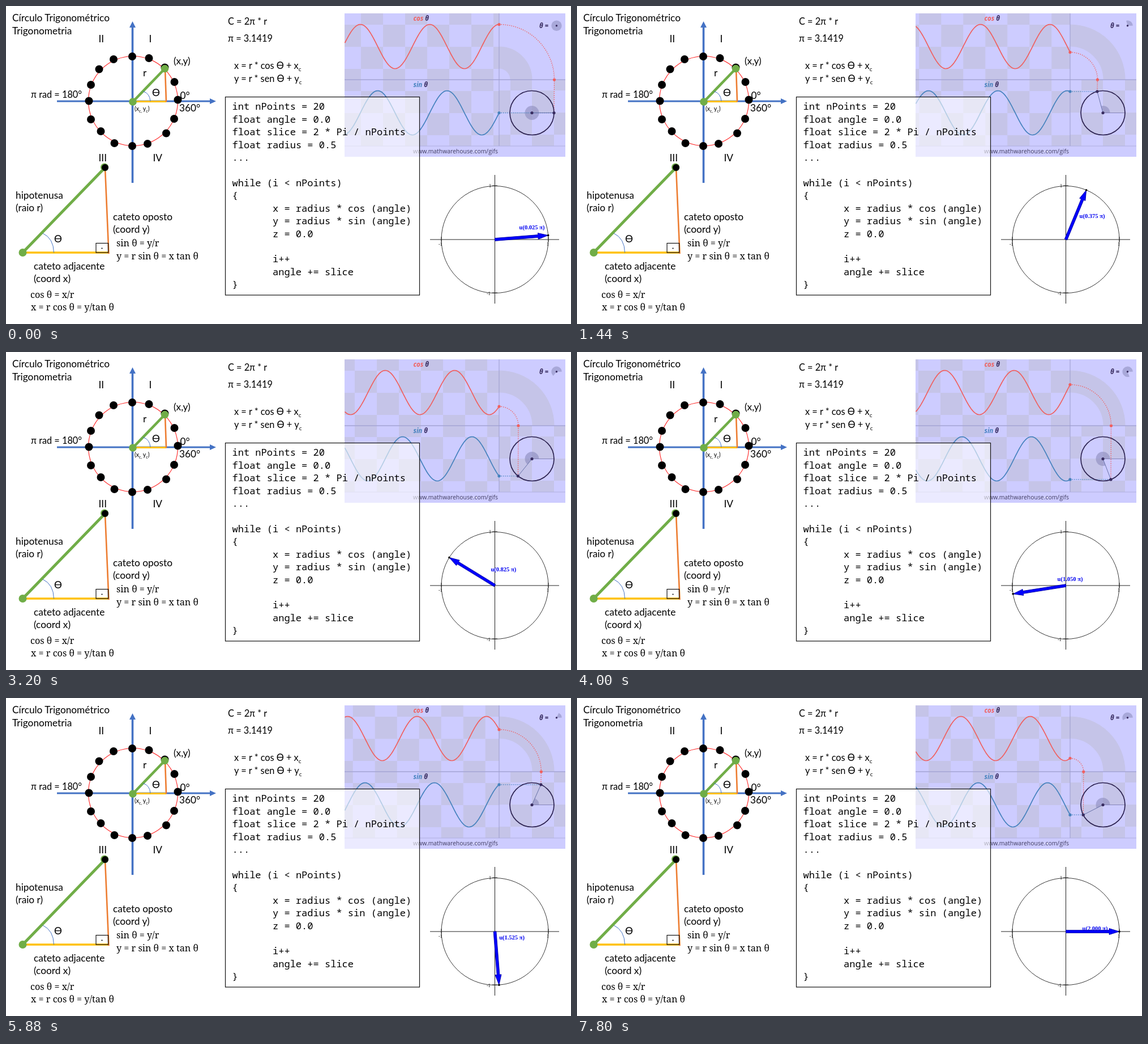
An HTML page for the animation above (7840 ms loop, 998x561 px).

```html
<!DOCTYPE html>
<html lang="pt">
<head>
<meta charset="utf-8">
<title>Círculo Trigonométrico</title>
<style>
html, body { margin: 0; width: 100%; height: 100%; overflow: hidden; background: #fff; }
svg { display: block; width: 998px; height: 561px; }
text { white-space: pre; }
.t { font: 17.3px Lato, sans-serif; }
.f { font: 16.3px Lato, sans-serif; }
.m { font: 16.2px "Noto Serif", serif; }
.c { font: 17.05px "Noto Sans Mono", monospace; }
.w { font: italic 700 11.5px "Open Sans", sans-serif; }
.u { font: 700 10.5px "Liberation Serif", serif; fill: #0000f0; }
.k { font: 8px "Liberation Serif", serif; }
</style>
</head>
<body>
<svg id="stage" viewBox="0 0 998 561"></svg>
<script>
const NS = "http://www.w3.org/2000/svg";
const stage = document.getElementById("stage");
const LOOP = 7840, TAU = Math.PI * 2;

function el(tag, attrs, parent = stage) {
  const e = document.createElementNS(NS, tag);
  for (const k in attrs) e.setAttribute(k, attrs[k]);
  parent.appendChild(e);
  return e;
}
const set = (e, attrs) => { for (const k in attrs) e.setAttribute(k, attrs[k]); };
const line = (x1, y1, x2, y2, stroke, w = 1) =>
  el("line", { x1, y1, x2, y2, stroke, "stroke-width": w });
const dot = (cx, cy, r, fill) => el("circle", { cx, cy, r, fill });
const ring = (cx, cy, r, stroke, w) =>
  el("circle", { cx, cy, r, fill: "none", stroke, "stroke-width": w });
const rect = (x, y, width, height, fill, more = {}) => el("rect", { x, y, width, height, fill, ...more });
const path = (d, stroke, w, more = {}) => el("path", { d, fill: "none", stroke, "stroke-width": w, ...more });
function text(str, x, y, cls = "t", more = {}) {
  const e = el("text", { x, y, class: cls, ...more });
  e.textContent = str;
  return e;
}
function sub(e, parts) {
  parts.forEach(([s, a]) => { el("tspan", a || {}, e).textContent = s; });
}

// Wave panel
const AX = 871, MID = 130, AMP = 39, COS_Y = 71.5, SIN_Y = 188.5, WAVE = AMP * Math.PI;
const LIGHT = "#cdccff", DARK = "#c5c4e8", RED = "#f06060", BLUE = "#4682be", INK = "#382c60";
const wheel = { x: 929, y: SIN_Y };

const defs = el("defs", {});
const tiles = el("pattern", { id: "tiles", width: 78, height: 78, patternUnits: "userSpaceOnUse" }, defs);
el("rect", { width: 78, height: 78, fill: LIGHT }, tiles);
el("rect", { width: 39, height: 39, fill: DARK }, tiles);
el("rect", { x: 39, y: 39, width: 39, height: 39, fill: DARK }, tiles);

rect(598, 13, 390, 253, LIGHT);
rect(598, 13, 273, 234, "url(#tiles)");
const bend = path("", DARK, 39);
[[891, 130, 38, 19], [968, 130, 20, 19], [871, 149, 20, 39], [929, 149, 39, 39],
 [891, 188, 38, 39], [968, 188, 20, 39], [871, 227, 20, 20], [929, 227, 39, 20]]
  .forEach(b => rect(...b, DARK));
line(598, MID, 988, MID, "#a4a4d4", 1.3);
line(598, 247, 988, 247, "#b0b0de");
line(AX, 13, AX, 247, "#9c9ccc");
[["cos ", RED, 26], ["sin ", BLUE, 143]].forEach(([s, fill, y]) =>
  sub(text("", 719.5, y, "w"), [[s, { fill }], ["θ", { fill: INK }]]));
text("θ =", 942, 38.5, "w", { fill: INK });
text("www.mathwarehouse.com/gifs", 794, 260, "", {
  "text-anchor": "middle", fill: "#403c60", style: "font:10.4px 'Open Sans',sans-serif" });

const sector = (op) => el("path", { fill: "#9090c0", "fill-opacity": op });
const bigPie = sector(.65), smallPie = sector(.6);
const cosWave = path("", RED, 1.7), sinWave = path("", BLUE, 1.7);
const dash = { "stroke-dasharray": "1.6 2" };
const cosLink = path("", RED, 1.3, dash), sinLink = path("", BLUE, 1.3, dash);
line(wheel.x, wheel.y, wheel.x + AMP, wheel.y, "#7474a8", .8);
const spoke = path("", "#6872a8", 1);
ring(wheel.x, wheel.y, AMP, "#2c2250", 1.7);
dot(wheel.x, wheel.y, 2.6, INK);
dot(972.5, 34.8, 1.7, INK);
const cosDot = dot(AX, 0, 2.6, RED), turnDot = dot(0, MID, 2.6, RED);
const sinDot = dot(AX, 0, 2.6, BLUE), rimDot = dot(0, 0, 2.6, INK);

function wave(fn, cy, a) {
  let d = "";
  for (let x = 598.5; x <= AX; x += 1.5)
    d += `${d ? "L" : "M"}${x} ${(cy - AMP * fn(a - (AX - x) * TAU / WAVE)).toFixed(2)}`;
  return d + `L${AX} ${cy - AMP * fn(a)}`;
}
function pie(x, y, r, a) {
  if (a === 0) return `M${x - r} ${y}a${r} ${r} 0 1 0 ${2 * r} 0a${r} ${r} 0 1 0 ${-2 * r} 0`;
  return `M${x} ${y}h${r}A${r} ${r} 0 ${+(a > Math.PI)} 0 ${x + r * Math.cos(a)} ${y - r * Math.sin(a)}Z`;
}
function drawWaves(step) {
  const a = step % 120 * TAU / 120, c = AMP * Math.cos(a), s = AMP * Math.sin(a);
  const y = COS_Y - c, x = wheel.x + c, r = MID - y, sy = wheel.y - s;
  // the checkerboard slides by one full repeat per turn
  set(tiles, { patternTransform: `translate(${822 - a / TAU * 78} 33)` });
  const R = a < .8 ? 39 : 78;
  set(bend, { d: `M${AX} ${MID - R}A${R} ${R} 0 0 1 ${AX + R} ${MID}` });
  set(cosWave, { d: wave(Math.cos, COS_Y, a) });
  set(sinWave, { d: wave(Math.sin, SIN_Y, a) });
  set(cosLink, { d: `M${AX} ${y}A${r} ${r} 0 0 1 ${AX + r} ${MID}L${x} ${sy}` });
  set(sinLink, { d: `M${AX} ${sy}H${x}` });
  set(spoke, { d: `M${wheel.x} ${wheel.y}L${x} ${sy}` });
  set(bigPie, { d: pie(wheel.x, wheel.y, 12.5, a) });
  set(smallPie, { d: pie(972.5, 34.8, 9.2, a) });
  set(cosDot, { cy: y });
  set(turnDot, { cx: AX + r });
  set(sinDot, { cy: sy });
  set(rimDot, { cx: x, cy: sy });
}

// Code box
rect(387.5, 160.5, 343, 349.5, "#fff", { "fill-opacity": .6, stroke: "#111", "stroke-width": 1.2 });
`int nPoints = 20
float angle = 0.0
float slice = 2 * Pi / nPoints
float radius = 0.5
...

while (i < nPoints)
{
       x = radius * cos (angle)
       y = radius * sin (angle)
       z = 0.0

       i++
       angle += slice
}`.split("\n").forEach((s, i) => {
  const code = s.trimStart();
  text(code, code === s ? 399.5 : 471, 183.3 + i * 22.42, "c");
});

// Unit circle on the left
const AXIS = "#4472c4", GREEN = "#70ad47", ORANGE = "#ed7d31", GOLD = "#ffc000";
line(223.5, 312, 223.5, 38, AXIS, 3.6);
line(90, 168, 362, 168, AXIS, 3);
path("M223.5 27l5.5 11h-11zM371 168l-11 -5v10z", "none", 0, { fill: AXIS });
ring(224.5, 167.5, 79, "#ff2020", 1.1);
line(224, 168.5, 283, 168.5, GOLD, 3);
line(281, 110, 283, 169, ORANGE, 2.6);
[[223, 89], [252.5, 92], [280.5, 108.5], [297.5, 134], [303.5, 165.5], [297, 199], [283, 224.5], [250, 243],
 [223, 247], [191.5, 242], [167.5, 221], [150, 200], [146.5, 167.5], [150, 139], [164.5, 111.5], [190, 94]]
  .forEach(([x, y]) => dot(x, y, 7, "#000"));
line(224, 169, 281, 110, GREEN, 4.6);
dot(224, 169, 6.8, GREEN);
dot(280.5, 110.5, 6.8, GREEN);
path("M242 150.5Q254 154 255 168", AXIS, 1);

// Right triangle
line(29.5, 435, 181, 435, GOLD, 3.6);
line(175, 285, 181.5, 437, ORANGE, 2.6);
line(29.5, 435, 175, 285, GREEN, 4.8);
dot(29.5, 435, 7, GREEN);
dot(174, 284.5, 7, GREEN);
dot(175, 285, 6, "#000");
rect(159, 418.5, 21.5, 16.5, "none", { stroke: "#000", "stroke-width": 1.1 });
dot(169.5, 427.5, 1.1, "#000");
path("M65 401Q84 410 84.5 435", AXIS, 1);

[["Círculo Trigonométrico", 11, 27], ["Trigonometria", 11, 49.5], ["II", 163.5, 63.5], ["I", 252.5, 63.5],
 ["III", 163.5, 273.5], ["IV", 259.5, 273.5], ["r", 242, 124], ["(x,y)", 296, 103], ["ϴ", 258, 159],
 ["0°", 307.5, 164], ["360°", 306, 186], ["hipotenusa", 17, 340], ["(raio r)", 17, 362],
 ["ϴ", 85, 417], ["cateto oposto", 189, 378], ["(coord y)", 189, 400], ["cateto adjacente", 49, 465],
 ["(coord x)", 49, 487]].forEach(a => text(...a));
[["π rad = 180°", 44, 161.5], ["C = 2π * r", 392, 33], ["π = 3.1419", 392, 63]].forEach(a => text(...a, "f"));
[["sin θ = y/r", 195, 424], ["y = r sin θ = x tan θ", 195, 447],
 ["cos θ = x/r", 43, 515], ["x = r cos θ = y/tan θ", 44, 537]].forEach(a => text(...a, "m"));
const small = { "font-size": 10, dy: 4 };
sub(text("", 403, 111, "f"), [["x = r * cos ϴ + x"], ["c", small]]);
sub(text("", 403, 134, "f"), [["y = r * sen ϴ + y"], ["c", small]]);
const tiny = { "font-size": 7, dy: 2.5 }, back = { dy: -2.5 };
sub(text("", 227, 185, "t", { style: "font-size:10.6px" }), [["(x"], ["c, ", tiny], ["y", back], ["c", tiny], [")", back]]);

// Rotating vector
const O = { x: 863.5, y: 412, r: 94.5 };
line(749, O.y, 977, O.y, "#222", 1);
line(O.x, 298, O.x, 525, "#222", 1);
ring(O.x, O.y, O.r, "#222", .9);
[["1", 853, 320], ["1", 955, 423], ["-1", 764, 423], ["-1", 849, 510]].forEach(a => text(...a, "k"));
line(859, 317, 868, 317, "#222");
line(859, 506, 868, 506, "#222");
line(769, 407, 769, 416, "#222");
line(958, 407, 958, 416, "#222");
const label = text("", 0, 0, "u", { "text-anchor": "middle" });
const arrow = el("path", { fill: "#0000ff", stroke: "#0000a0", "stroke-width": .8 });
const tip = dot(0, 0, 1.8, "#000");

// step, label centre x, y
const labelPath = [[1, 929, 390], [15, 910, 370], [25, 890, 371], [42, 871, 400],
  [53, 880, 418.5], [69, 907, 421], [80, 915, 406]];

function labelAt(n) {
  let i = 0;
  while (i < labelPath.length - 2 && n > labelPath[i + 1][0]) i++;
  const at = j => labelPath[Math.max(0, Math.min(labelPath.length - 1, j))];
  const [p, q, r, s] = [at(i - 1), at(i), at(i + 1), at(i + 2)];
  const span = r[0] - q[0], u = (n - q[0]) / span;
  return [1, 2].map(k => {
    const m0 = (r[k] - p[k]) / (r[0] - p[0]) * span, m1 = (s[k] - q[k]) / (s[0] - q[0]) * span;
    const u2 = u * u, u3 = u2 * u;
    return (2 * u3 - 3 * u2 + 1) * q[k] + (u3 - 2 * u2 + u) * m0 + (3 * u2 - 2 * u3) * r[k] + (u3 - u2) * m1;
  });
}
function drawVector(n) {
  const a = n * Math.PI / 40, r = O.r, [x, y] = labelAt(n);
  set(arrow, {
    d: `M0 -2.4H${r - 18}V-5.5L${r} 0L${r - 18} 5.5V2.4H0Z`,
    transform: `translate(${O.x} ${O.y}) rotate(${-a * 360 / TAU})`
  });
  set(tip, { cx: O.x + r * Math.cos(a), cy: O.y - r * Math.sin(a) });
  set(label, { x, y: y + 3.5 });
  label.textContent = `u(${(n / 40).toFixed(3)} π)`;
}

function frame() {
  const t = performance.now() % LOOP;
  drawWaves(Math.floor((t + 2) / 41.22));
  drawVector(Math.min(80, 1 + Math.floor((t + 24) / 98)));
  requestAnimationFrame(frame);
}
frame();
</script>
</body>
</html>
```
